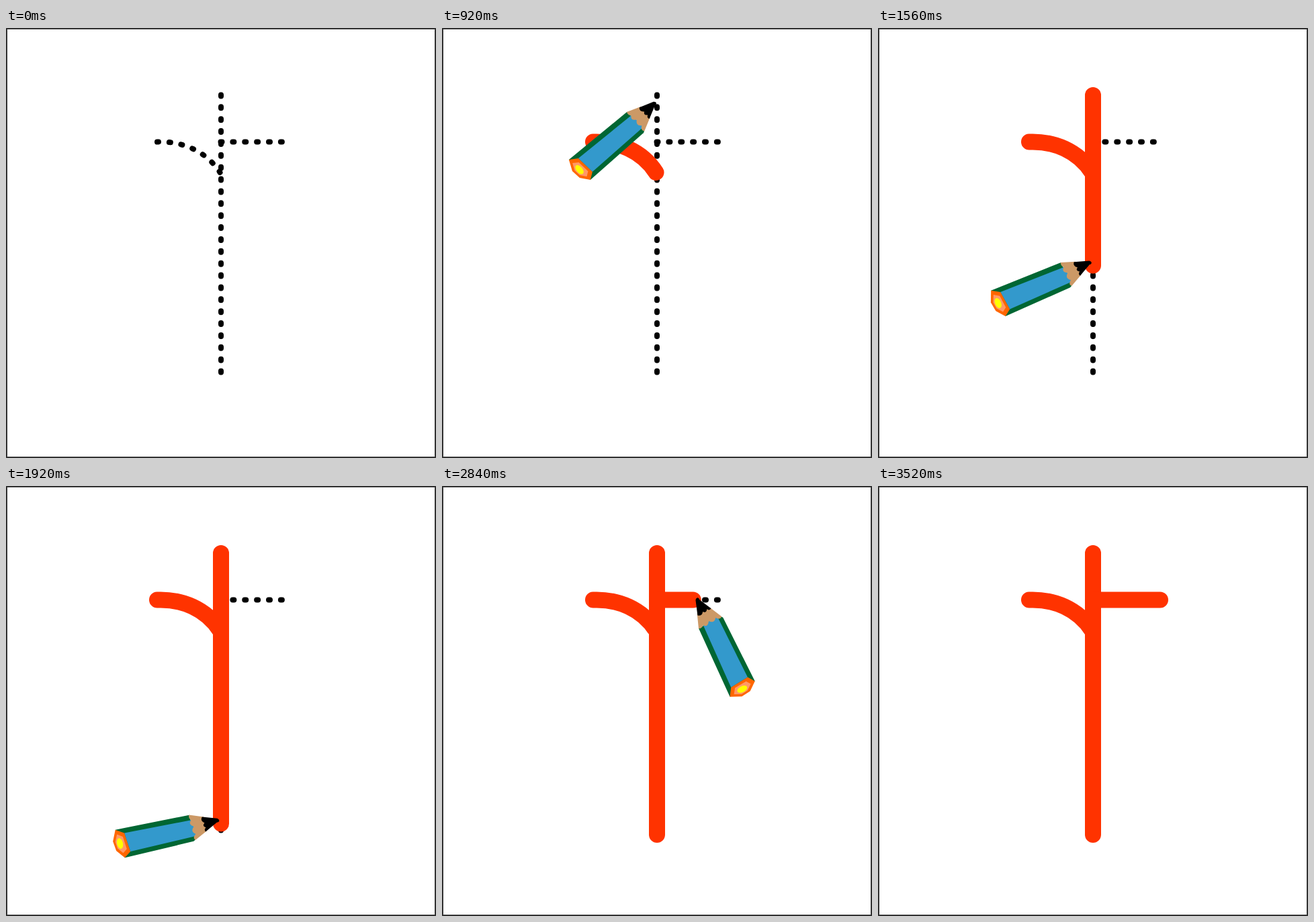
These frames come from a looping animation (640x640 px, 3.6 s). An HTML page:

```html
<!DOCTYPE html>
<html lang="en">
<head>
<meta charset="utf-8">
<title>Stroke order</title>
<style>
  html, body { margin: 0; width: 100%; height: 100%; overflow: hidden; background: #fff; }
  svg { display: block; width: 100vw; height: 100vh; }
  .dots { fill: none; stroke: #000; stroke-width: 8; stroke-linecap: round; stroke-dasharray: 2 15.87; }
  .ink { fill: none; stroke: #f30; stroke-width: 24; stroke-linecap: round; visibility: hidden; }
</style>
</head>
<body>
<svg viewBox="0 0 640 640">
  <g class="dots">
    <path d="M225 169.5C262 168 298 183 318.5 215"/>
    <path d="M320 99.5V512.5"/>
    <path d="M319.5 169.5H411.5"/>
  </g>
  <path class="ink" pathLength="100" d="M225 169.5C262 168 298 183 318.5 215"/>
  <path class="ink" pathLength="100" d="M320 100V519"/>
  <path class="ink" pathLength="100" d="M320 169.5H420"/>

  <!-- Tip at the origin, body along +x -->
  <g id="pencil" visibility="hidden">
    <path fill="#063" d="M40.5 17.2L152.6 20.8L148.3 -22.8L43 -22.5Q40 -22 39.5 -19Z"/>
    <path fill="#39c" d="M38 9L140.7 13.1L138.1 -15.8L37 -15.6Z"/>
    <path fill="#c96" d="M41 17.4L20 9.5V-11.5L40 -21.3Q44 -17 37.5 -12.5Q45 -7 37.5 -1Q46 4 39.5 9Q43 13 41 17.4Z"/>
    <path d="M22.5 10L1 2.6Q-2 .5 -.8 -2Q.5 -3.4 3 -3L22.3 -12.5Q24.5 -9 20.5 -6.5Q26 -3 21 .5Q27 5 22.5 10Z"/>
    <path fill="#f60" d="M152.6 20.8L140.7 13.1L138.1 -15.8L148.3 -22.8L158.3 -10L160 4.7Z"/>
    <path fill="#f96" d="M151.8 13.6L144 8.2L142.5 -11L149 -15.6L155.6 -7L156.7 3.2Z"/>
    <ellipse cx="150.5" cy="-.6" rx="4.5" ry="8" fill="#ff0"/>
  </g>
  <rect x="1" y="1" width="638" height="638" fill="none" stroke="#333" stroke-width="2"/>
</svg>
<script>
const STEP = 40, LOOP = 3600, LAST = 88;
const pencil = document.getElementById('pencil');
const inks = [...document.querySelectorAll('.ink')];
const arcLength = inks[0].getTotalLength();

// step, tip x, tip y, angle
const poses = [
  [13, 322.5, 217, 138.7],
  [24, 316.7, 100.4, 138.7],
  [49, 316, 513.7, 168],
  [64, 329.2, 167.2, 63.6],
  [78, 429.5, 168.6, 63.6]
];
// first step, last step, share drawn at the first step
const strokes = [[1, 13, 4], [24, 49, 1.2], [64, 78, 7.5]];

const lerp = (a, b, p) => a + (b - a) * p;
const part = (n, a, b) => Math.min(1, Math.max(0, (n - a) / (b - a)));
const drawn = (n, [from, to, first]) => lerp(first, 100, part(n, from, to));

function pose(n) {
  if (n < 13) {
    const p = part(n, 1, 13);
    const end = inks[0].getPointAtLength(arcLength * p);
    return [end.x + lerp(-9.5, 4, p), end.y + lerp(-1.5, 2, p), 138.7];
  }
  const i = Math.max(1, poses.findIndex(k => n <= k[0]));
  const b = n > 78 ? poses[4] : poses[i];
  const a = n > 78 ? b : poses[i - 1];
  const p = a === b ? 1 : part(n, a[0], b[0]);
  return [1, 2, 3].map(j => lerp(a[j], b[j], p));
}

function draw(n) {
  inks.forEach((ink, i) => {
    ink.style.visibility = n >= strokes[i][0] ? 'visible' : 'hidden';
    ink.style.strokeDasharray = `${drawn(n, strokes[i])} 300`;
  });
  const [x, y, angle] = pose(n);
  pencil.setAttribute('transform', `translate(${x} ${y}) rotate(${angle})`);
  pencil.setAttribute('visibility', n > 0 && n < LAST ? 'visible' : 'hidden');
  pencil.setAttribute('opacity', 1 - part(n, 78, LAST));
}

const start = performance.now();
function tick() {
  const t = (performance.now() - start) % LOOP;
  draw(Math.min(LAST, Math.floor(t / STEP)));
  requestAnimationFrame(tick);
}
tick();
</script>
</body>
</html>
```
